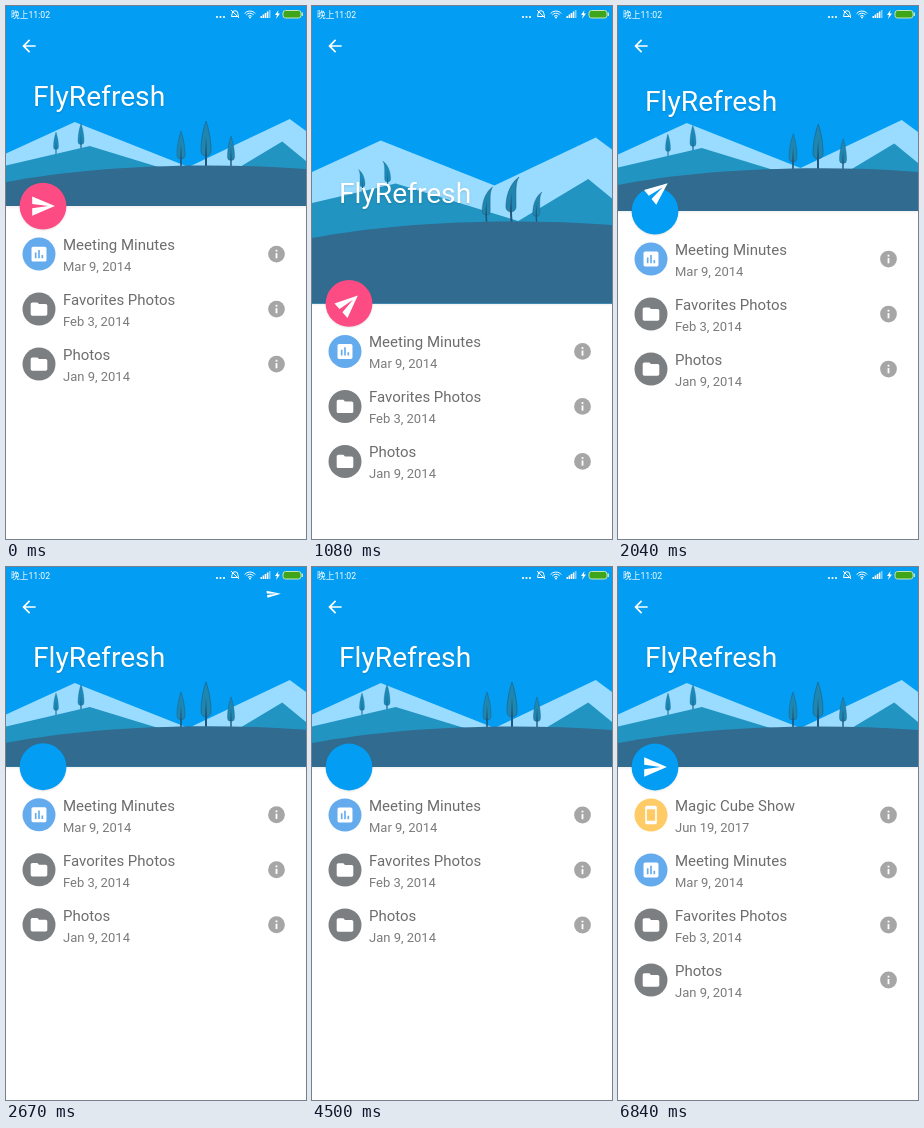
Animation, 300 px wide and 533 px high, one loop 6.87 s. Source, as an HTML page with a canvas:

```html
<!DOCTYPE html>
<html lang="en">
<head>
<meta charset="utf-8">
<title>Pull to refresh</title>
<style>
html, body { margin: 0; width: 100%; height: 100%; overflow: hidden; background: #fff; }
canvas { display: block; width: 300px; height: 533px; }
</style>
</head>
<body>
<canvas id="stage" width="300" height="533"></canvas>
<script>
const ctx = document.getElementById('stage').getContext('2d');
const LOOP = 6870, PULL = 104, ROW = 55;
const RELEASE = 1970, FLY_OUT = 1030, FLY_IN = 4560, INSERT = 6140;
const SKY = '#039df3';

const icons = {
  send: 'M2 21L23 12 2 3v7l15 2-15 2z',
  back: 'M20 11H7.83l5.59-5.59L12 4l-8 8 8 8 1.41-1.41L7.83 13H20z',
  folder: 'M10 4H4c-1.1 0-2 .9-2 2v12c0 1.1.9 2 2 2h16c1.1 0 2-.9 2-2V8c0-1.1-.9-2-2-2h-8z',
  chart: 'M19 3H5c-1.1 0-2 .9-2 2v14c0 1.1.9 2 2 2h14c1.1 0 2-.9 2-2V5c0-1.1-.9-2-2-2zM9 17H7v-7h2zM13 17h-2V7h2zM17 17h-2v-4h2z',
  phone: 'M17 1H7c-1.1 0-2 .9-2 2v18c0 1.1.9 2 2 2h10c1.1 0 2-.9 2-2V3c0-1.1-.9-2-2-2zM17 19H7V5h10z'
};
for (const name in icons) icons[name] = new Path2D(icons[name]);

const items = [
  ['Magic Cube Show', 'Jun 19, 2017', 'phone', '#ffcb66'],
  ['Meeting Minutes', 'Mar 9, 2014', 'chart', '#64abee'],
  ['Favorites Photos', 'Feb 3, 2014', 'folder', '#7b7f82'],
  ['Photos', 'Jan 9, 2014', 'folder', '#7b7f82']
];

const span = (t, start, length) => Math.min(1, Math.max(0, (t - start) / length));
const mix = (a, b, k) => a + (b - a) * k;
const smooth = k => (1 - Math.cos(Math.PI * k)) / 2;
const decel = k => 1 - (1 - k) ** 2;

// Quadratic curve from (0,0) to (1,1) read as y over x
function curve(cx, cy, x) {
  const a = 1 - 2 * cx;
  const s = (-cx + Math.sqrt(cx * cx + a * x)) / a;
  return 2 * s * (1 - s) * cy + s * s;
}

function bounce(k) {
  k *= 1.1226;
  const hop = x => 8 * x * x;
  if (k < 0.3535) return hop(k);
  if (k < 0.7408) return hop(k - 0.54719) + 0.7;
  if (k < 0.9644) return hop(k - 0.8526) + 0.9;
  return Math.min(1, hop(k - 1.0435) + 0.95);
}

function pullAt(t) {
  if (t < 700) return t / 10;
  if (t < RELEASE) return 70 + (PULL - 70) * decel(span(t, 700, 680));
  const k = (t - RELEASE) / 1000;
  if (k >= 1) return 0;
  return -PULL * 2 ** (-11 * k) * Math.sin((k - 0.075) * Math.PI * 2 / 0.3);
}

function fillPoly(points, color) {
  ctx.beginPath();
  points.forEach(([x, y]) => ctx.lineTo(x, y));
  ctx.fillStyle = color;
  ctx.fill();
}

function circle(x, y, r, color) {
  ctx.beginPath();
  ctx.arc(x, y, r, 0, Math.PI * 2);
  ctx.fillStyle = color;
  ctx.fill();
}

function text(str, x, y, size, color) {
  ctx.font = `${size}px Roboto, "Noto Sans CJK SC", sans-serif`;
  ctx.fillStyle = color;
  ctx.fillText(str, x, y);
}

function withShadow(alpha, paint) {
  ctx.save();
  ctx.shadowColor = `rgba(0,0,0,${alpha})`;
  ctx.shadowBlur = 2;
  ctx.shadowOffsetY = 1;
  paint();
  ctx.restore();
}

function icon(name, x, y, scale, flat = 1, angle = 0) {
  ctx.save();
  ctx.translate(x, y);
  ctx.scale(scale, scale * flat);
  ctx.rotate(angle * Math.PI / 180);
  ctx.translate(-12, -12);
  ctx.fillStyle = '#fff';
  ctx.fill(icons[name], 'evenodd');
  ctx.restore();
}

// Ridges are given on a 240 by 180 grid
function mountain(points, dy, color) {
  const ridge = points.map(([x, y]) => [x * 1.25, y * 1.5 + 5 + dy]);
  fillPoly([...ridge, [300, 420], [0, 420]], color);
}

// A tree is built on a 100 by 200 grid whose base is at (0, 0)
function tree(x, y, scale, bend, leaf, trunk) {
  const N = 25, low = 10, top = 17;
  const spine = Array.from({ length: N + 1 }, (_, i) =>
    [curve(0.8, -0.6 * bend, i / N) * 30 * bend, -i * 200 / N]);
  const outline = (from, to, width) => {
    const part = spine.slice(from, to + 1);
    const side = sign => part.map(([px, py], i) => [px + sign * width(from + i), py]);
    return [...side(-1), ...side(1).reverse()];
  };
  ctx.save();
  ctx.translate(x, y);
  ctx.scale(scale, Math.abs(scale));
  const [bx, by] = spine[low];
  ctx.beginPath();
  ctx.arc(bx, by, 20, 0, Math.PI);
  outline(low, N, i => 20 * (1 - ((i - low) / (N - low)) ** 2)).forEach(p => ctx.lineTo(...p));
  ctx.closePath();
  ctx.fillStyle = leaf;
  ctx.fill();
  ctx.strokeStyle = trunk;
  ctx.lineWidth = 2;
  ctx.stroke();
  fillPoly(outline(0, top, i => 4 * Math.min(1, (top - i) / 9)), trunk);
  ctx.restore();
}

function scene(pull) {
  const bend = pull / PULL;
  const edge = 200 + pull;
  const near = pull * 0.575, mid = pull * 0.385, far = pull * 0.19;
  ctx.save();
  ctx.beginPath();
  ctx.rect(0, 0, 300, edge);
  ctx.clip();
  ctx.fillStyle = SKY;
  ctx.fillRect(0, 0, 300, 400);

  mountain([[0, 95], [55, 74], [146, 104], [227, 72], [240, 80]], far, '#99dcff');
  tree(75, 147.5 + mid, -0.15, bend, '#1c8ab8', '#1b6590');
  tree(50, 151 + mid, -0.125, bend, '#1c8ab8', '#1b6590');
  mountain([[0, 103], [67, 90], [165, 115], [221, 87], [240, 100]], mid, '#2194c2');

  [[200, 0.25], [225, 0.175], [175, 0.2]].forEach(([x, s]) =>
    tree(x, 165 + near, s, bend, '#1f86b0', '#215578'));
  ctx.beginPath();
  ctx.moveTo(0, 176 + near);
  ctx.bezierCurveTo(80, 161 + near, 190, 155 + near, 300, 163 + near);
  ctx.lineTo(300, 420);
  ctx.lineTo(0, 420);
  ctx.fillStyle = '#316b8f';
  ctx.fill();
  ctx.restore();

  const shade = ctx.createLinearGradient(0, edge, 0, edge + 3);
  shade.addColorStop(0, 'rgba(0,0,0,.06)');
  shade.addColorStop(1, 'rgba(0,0,0,0)');
  ctx.fillStyle = shade;
  ctx.fillRect(0, edge, 300, 3);
}

function statusBar() {
  text('晚上11:02', 5, 12, 8.7, '#fff');
  [211, 214.5, 218].forEach(x => circle(x, 11, 1.1, '#fff'));
  ctx.strokeStyle = '#fff';
  ctx.lineWidth = 1;
  // Muted bell
  ctx.beginPath();
  ctx.arc(229, 7.5, 2.8, Math.PI, 0);
  ctx.lineTo(232.5, 10.5);
  ctx.lineTo(225.5, 10.5);
  ctx.closePath();
  ctx.moveTo(225, 4);
  ctx.lineTo(233, 12);
  ctx.stroke();
  // Wireless arcs
  [2.5, 4.8, 7].forEach(r => {
    ctx.beginPath();
    ctx.arc(244, 12, r, -Math.PI * 0.78, -Math.PI * 0.22);
    ctx.stroke();
  });
  circle(244, 11.5, 1, '#fff');
  for (let i = 0; i < 5; i++) {
    ctx.fillStyle = i < 4 ? '#fff' : 'rgba(255,255,255,.5)';
    ctx.fillRect(254.5 + i * 2.1, 10 - i * 1.5, 1.6, 2 + i * 1.5);
  }
  fillPoly([[272.5, 4], [269, 9], [271, 9], [270, 13], [274, 7.6], [271.8, 7.6]], '#fff');
  ctx.beginPath();
  ctx.roundRect(277, 4.5, 18, 7.5, 2.5);
  ctx.fillStyle = '#3fa61c';
  ctx.fill();
  ctx.strokeStyle = '#c4e6b4';
  ctx.stroke();
  ctx.fillStyle = '#c4e6b4';
  ctx.fillRect(295.5, 6.5, 1.5, 3.5);
}

function row([title, date, name, color], y, flat = 1) {
  const flatten = (x, draw) => {
    ctx.save();
    ctx.translate(x, y);
    ctx.scale(1, flat);
    draw();
    ctx.restore();
  };
  flatten(33, () => {
    circle(0, 0, 16.5, color);
    icon(name, 0, 0, 0.83);
  });
  text(title, 57, y - 4, 15, '#6d6d6d');
  text(date, 57, y + 17, 13, '#7b7b7b');
  flatten(270.5, () => {
    circle(0, 0, 8.4, '#a6a6a6');
    ctx.fillStyle = '#fff';
    ctx.fillRect(-0.9, -4.3, 1.8, 1.8);
    ctx.fillRect(-0.9, -1, 1.8, 5.2);
  });
}

function list(t, pull) {
  const shift = ROW * smooth(span(t, INSERT, 250));
  const top = 248 + pull;
  for (let i = 1; i < items.length; i++) row(items[i], top + (i - 1) * ROW + shift);
  const shown = span(t, INSERT + 250, 150);
  if (shown > 0) {
    const tilt = 30 * (1 - bounce(span(t, INSERT + 250, 400)));
    ctx.globalAlpha = shown;
    row(items[0], top, Math.cos(tilt * Math.PI / 180));
    ctx.globalAlpha = 1;
  }
}

function plane(t, pull) {
  const y = 200 + pull;
  const tilted = deg => Math.cos(deg * Math.PI / 180);
  if (t < RELEASE) {
    icon('send', 37, y, 1.08, 1, -45 * pull / PULL);
  } else if (t < RELEASE + FLY_OUT) {
    const k = span(t, RELEASE, FLY_OUT), d = decel(k);
    icon('send', 37 + 300 * smooth(k), y - 209 * curve(0.7, 1, k),
      1.08 * mix(1, 0.5, smooth(k)), tilted(60 * d), -45 * (1 - d));
  } else if (t >= FLY_IN) {
    const k = smooth(span(t, FLY_IN, 800));
    icon('send', mix(-23, 37, k), y - 8 * (1 - k), 1.08 * mix(0.9, 1, k), tilted(30 * (1 - k)));
  }
}

function draw(t) {
  const pull = pullAt(t);
  ctx.fillStyle = '#fff';
  ctx.fillRect(0, 0, 300, 533);
  scene(pull);
  list(t, pull);
  withShadow(0.15, () => text('FlyRefresh', 27, 99.8 + pull, 28.2, '#fff'));
  icon('back', 23, 40, 0.83);
  statusBar();
  withShadow(0.1, () => circle(37, 200 + pull, 23.4, t < 1200 ? '#fd4c84' : SKY));
  plane(t, pull);
}

const begin = performance.now();
function tick() {
  draw((performance.now() - begin) % LOOP);
  requestAnimationFrame(tick);
}
tick();
</script>
</body>
</html>
```
